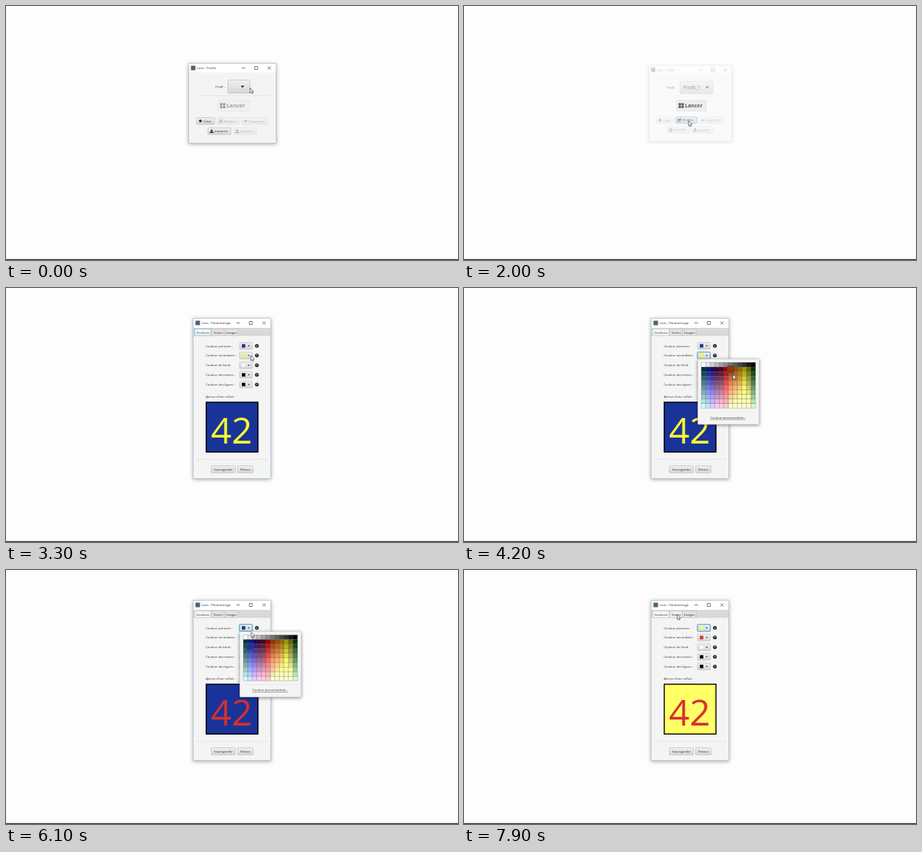
Animation of 600x338 px, one loop 8000 ms. Source, as an HTML page:

```html
<!DOCTYPE html>
<html lang="fr">
<head>
<meta charset="utf-8">
<title>Loto - Paramétrage</title>
<style>
  html, body { margin: 0; width: 100%; height: 100%; overflow: hidden; background: #fdfdfe; }
  svg { display: block; width: 600px; height: 338px; }
  text { font-family: "Open Sans", "Noto Sans", sans-serif; font-size: 4.25px; fill: #333; }
  .window { filter: drop-shadow(0 1px 2.5px rgba(0, 0, 0, .35)); }
  .popup { filter: drop-shadow(0 1px 2px rgba(0, 0, 0, .45)); }
</style>
</head>
<body>
<svg id="stage" viewBox="0 0 600 338">
  <defs>
    <linearGradient id="face" x2="0" y2="1">
      <stop offset="0" stop-color="#f0f0f0"/>
      <stop offset="1" stop-color="#d6d6d6"/>
    </linearGradient>
  </defs>
</svg>
<script>
const LOOP = 8000;
const BLUE = '#1a3399', RED = '#d6302e', YELLOW = '#ffff33', LEMON = '#ffff66';
const FOCUS = '#3fa9d6', EDGE = '#b9b9b9';
const stage = document.getElementById('stage');

function add(parent, tag, attrs = {}, text) {
  const node = document.createElementNS('http://www.w3.org/2000/svg', tag);
  for (const key in attrs) node.setAttribute(key, attrs[key]);
  if (text) node.textContent = text;
  parent.appendChild(node);
  return node;
}
const group = (parent, attrs) => add(parent, 'g', attrs);
const rect = (parent, x, y, width, height, fill, more) =>
  add(parent, 'rect', { x, y, width, height, fill, ...more });
const label = (parent, x, y, text, more) => add(parent, 'text', { x, y, ...more }, text);
const line = (parent, d, stroke = '#333', width = .6) =>
  add(parent, 'path', { d, fill: 'none', stroke, 'stroke-width': width });
const shape = (parent, d, fill = '#333') => add(parent, 'path', { d, fill });
const face = (parent, x, y, w, h) =>
  rect(parent, x, y, w, h, 'url(#face)', { rx: 1, stroke: EDGE, 'stroke-width': .6 });

// Rows are [ms, value, jumps to the next row]; without jumps the value holds.
function track(node, prop, rows) {
  const frames = rows.map(([ms, value, jumps = 1]) => ({
    offset: Math.max(0, ms - 2) / LOOP, [prop]: value, easing: `steps(${jumps}, end)`
  }));
  frames.push({ offset: 1, [prop]: rows[rows.length - 1][1] });
  node.animate(frames, { duration: LOOP, iterations: Infinity });
}
const move = (x, y) => `translate(${x}px, ${y}px)`;

function frame(parent, x, y, w, h, title, bar) {
  rect(parent, x, y, w, h, '#f4f4f4', { stroke: '#a9c3cb', 'stroke-width': .7 });
  rect(parent, x + .4, y + .4, w - .8, bar, '#fff');
  rect(parent, x + 3, y + 3, 6, 6, '#4b6272');
  label(parent, x + 11, y + 7.8, title, { style: 'font-size:4.35px' });
  const r = x + w, m = y + 6;
  line(parent, `M${r - 45.5} ${m}h4.5 M${r - 28.5} ${m - 2}h4v4h-4z M${r - 11} ${m - 2}l4 4m0-4l-4 4`, '#222');
}

const icons = {
  plus: 'M-.7-2h1.4v1.3h1.3v1.4h-1.3v1.3h-1.4v-1.3h-1.3v-1.4h1.3z',
  minus: 'M-2-.7h4v1.4h-4z',
  edit: 'M-2.3-1.6h2.6l-.6.6h-1.4v2.8h2.8v-1.2l.6-.6v2.4h-4z M-.8 .8l.2-1 2.2-2.2 .9.9-2.2 2.2z',
  load: 'M-.7-2.3h1.4v1.8h1.3l-2 1.9-2-1.9h1.3z M-2.5 1h1.2l1.3 1 1.3-1h1.2v1.4h-5z',
  send: 'M0-2.4l2 2h-1.3v1.6h-1.4v-1.6h-1.3z M-2.5 1h1.2v.5h2.6v-.5h1.2v1.4h-5z'
};
function iconButton(parent, x, y, w, icon, text) {
  const g = group(parent);
  face(g, x, y, w, 9);
  add(g, 'path', { d: icons[icon], fill: '#222', transform: `translate(${x + 5} ${y + 4.5})` });
  label(g, x + 9, y + 6.1, text);
  return g;
}
const arrow = (parent, x, y, s) => shape(parent, `M${x - s} ${y - s / 2}h${2 * s}l${-s} ${s * 1.2}z`);

rect(stage, 0, 0, 600, 338, '#fdfdfe');
rect(stage, 0, 336.8, 600, 1.2, '#333');

// Profile window
const profiles = group(stage, { style: 'transform-origin:300.5px 129.5px' });
track(profiles, 'transform', [[0, 'scale(1)'], [2000, 'scale(.95)']]);

const panel = group(profiles, { class: 'window' });
frame(panel, 242.5, 76.5, 116, 106, 'Loto - Profils', 11.5);
line(panel, 'M252 119.5H350', '#d4d4d4', .5);
iconButton(panel, 253, 148.5, 24, 'plus', 'Créer');
const erase = iconButton(panel, 313, 148.5, 34.5, 'minus', 'Supprimer');
iconButton(panel, 268, 162, 30.5, 'load', 'Importer');
const send = iconButton(panel, 302, 162, 30.5, 'send', 'Exporter');
for (const g of [erase, send]) track(g, 'opacity', [[0, .35], [1200, 1]]);
track(panel, 'opacity', [[0, 1], [2000, .3], [2100, 0]]);

const edit = iconButton(profiles, 280, 148.5, 30, 'edit', 'Modifier');
track(edit, 'opacity', [[0, .35], [1200, 1], [2000, .65], [2100, 0]]);
track(edit.firstChild, 'stroke', [[0, EDGE], [1700, FOCUS]]);

const launch = group(profiles);
rect(launch, 281, 125, 42, 15.5, '#ececec', { rx: 1.5, stroke: '#d0d0d0', 'stroke-width': .5 });
for (const x of [284, 288]) for (const y of [129.3, 133]) rect(launch, x, y, 3.3, 3, '#333', { rx: .4 });
label(launch, 293, 135.4, 'Lancer', { style: 'font-size:7.2px;font-weight:700' });
track(launch, 'opacity', [[0, .45], [1200, 1], [2000, .8], [2100, 0]]);

const empty = group(profiles);
label(empty, 278, 109, 'Profil :');
const box = face(empty, 294.5, 98.5, 29.5, 17.5);
arrow(empty, 314, 107.3, 2.4);
track(box, 'stroke', [[0, EDGE], [100, FOCUS]]);
track(empty, 'opacity', [[0, 1], [1200, 0]]);

const chosen = group(profiles);
label(chosen, 267.5, 109, 'Profil :');
face(chosen, 286, 98.5, 46, 17.5);
label(chosen, 290.5, 109.6, 'Profil_1', { style: 'font-size:6.9px' });
arrow(chosen, 324, 107.3, 2.4);
track(chosen, 'opacity', [[0, 0], [1200, 1], [2000, .5], [2100, 0]]);

const list = group(stage, { class: 'popup' });
rect(list, 294.5, 117, 46, 15, '#fff', { stroke: '#c4c4c4', 'stroke-width': .5 });
const item = rect(list, 295, 118.5, 45, 12, '#fff');
label(list, 299, 127, 'Profil_1', { style: 'font-size:6.9px' });
track(item, 'fill', [[0, '#fff'], [900, '#b5dcec']]);
track(list, 'opacity', [[0, 0], [300, .6], [400, 1], [1200, 0]]);

// Settings window
const settings = group(stage, { class: 'window', style: 'transform-origin:300px 147px' });
track(settings, 'opacity', [[0, 0], [2300, .4], [2400, .8], [2500, 1]]);
track(settings, 'transform', [[0, 'scale(.95)'], [2300, 'scale(.96)'], [2400, 'scale(.99)'], [2500, 'scale(1)']]);
frame(settings, 248.5, 40.5, 103, 213, 'Loto - Paramétrage', 12.5);
rect(settings, 249, 53, 102, 10, '#d9d9d9');
line(settings, 'M249 63H351', EDGE, .5);

function tab(x, w, text, fill) {
  const back = rect(settings, x, 54.3, w, 8.9, fill, { stroke: EDGE, 'stroke-width': .5 });
  label(settings, x + 2.2, 60.5, text);
  return back;
}
const colours = tab(250.5, 21.5, 'Couleurs', '#f4f4f4');
const texts = tab(273, 16.2, 'Textes', '#e2e2e2');
tab(290, 18.2, 'Images', '#e2e2e2');
track(colours, 'stroke', [[0, FOCUS], [3900, EDGE]]);
track(texts, 'fill', [[0, '#e2e2e2'], [7800, '#efefef']]);

const rows = [
  ['primaire', BLUE], ['secondaire', YELLOW], ['de fond', '#fff'],
  ['des textes', '#000'], ['des lignes', '#000']
];
const swatches = rows.map(([name, fill], i) => {
  const y = 77 + 12.85 * i;
  label(settings, 265.2, y + 1.6, `Couleur ${name} :`);
  face(settings, 310, y - 4.5, 16.8, 9);
  const swatch = rect(settings, 313, y - 2.4, 4.8, 4.8, fill, { stroke: '#bbb', 'stroke-width': .3 });
  arrow(settings, 322.2, y, 1.4);
  add(settings, 'circle', { cx: 333, cy: y, r: 2.5, fill: '#222' });
  label(settings, 333, y + 1.5, '?', { 'text-anchor': 'middle', style: 'font-size:4px;font-weight:700;fill:#fff' });
  return swatch;
});
const ring = rect(settings, 309.8, 72.3, 17.2, 9.4, 'none', { rx: 1, stroke: FOCUS, 'stroke-width': 1 });
track(ring, 'opacity', [[0, 0], [3900, 1]]);
track(ring, 'transform', [[0, move(0, 12.85)], [6000, move(0, 0)]]);

label(settings, 265.2, 146.3, "Aperçu d'une cellule :", { style: 'font-style:italic' });
const cell = rect(settings, 265.8, 152, 68.7, 66.3, BLUE, { stroke: '#000', 'stroke-width': 1.4 });
const number = label(settings, 299.5, 206.6, '42', { 'text-anchor': 'middle', style: 'font-size:48px' });
line(settings, 'M252 228H348', '#d4d4d4', .5);
for (const [x, w, text] of [[272.5, 32, 'Sauvegarder'], [307.5, 20.5, 'Retour']]) {
  face(settings, x, 236.5, w, 9.5);
  label(settings, x + w / 2, 242.8, text, { 'text-anchor': 'middle' });
}
for (const node of [cell, swatches[0]]) track(node, 'fill', [[0, BLUE], [7100, LEMON]]);
for (const node of [number, swatches[1]]) track(node, 'fill', [[0, YELLOW], [4800, RED]]);

// Colour popup: one grey row, then twelve hues that lighten downwards
const hues = ['033', '01a80', '1a068', '303', '4d01a', '900', '930', '94d0', '960', '990', '660', '030'];
const deep = [
  [0, 51, 51], [0, 26, 128], [26, 0, 104], [51, 0, 51], [77, 0, 26], [153, 0, 0],
  [153, 51, 0], [153, 77, 0], [153, 102, 0], [153, 153, 0], [102, 102, 0], [0, 51, 0]
];
function shade(col, row) {
  const rgb = row ? deep[col].map(v => Math.min(255, Math.round(v + 25.5 * (row - 1))))
                  : Array(3).fill(Math.round(255 * (1 - col / 11)));
  return `rgb(${rgb})`;
}
function picker(y, open, close, hovers) {
  const g = group(stage, { class: 'popup' });
  const left = 315, top = y + 4.5, w = 6, h = 6.1;
  rect(g, 310.3, y, 81.5, 87, '#f4f4f4', { rx: 1.2, stroke: '#c4c4c4', 'stroke-width': .5 });
  for (let row = 0; row < 10; row++) for (let col = 0; col < 12; col++)
    rect(g, left + col * w, top + row * h, w, h, shade(col, row), { stroke: '#555', 'stroke-width': .25 });
  line(g, `M314 ${y + 70.5}H388`, '#dcdcdc', .5);
  label(g, 350.5, y + 79.3, 'Couleur personnalisée..', { 'text-anchor': 'middle', 'text-decoration': 'underline' });
  const hover = rect(g, -1.4, -1.4, w + 2.8, h + 2.8, '#fff', { stroke: '#34506a', 'stroke-width': .8 });
  track(hover, 'transform', hovers.map(([ms, col, row]) => [ms, move(left + col * w, top + row * h)]));
  track(hover, 'fill', hovers.map(([ms, col, row]) => [ms, shade(col, row)]));
  track(g, 'opacity', [[0, 0], [open, 1], [close, 0]]);
}
picker(94.5, 3900, 4800, [[0, 9, 3], [4000, 4, 1], [4100, 6, 1], [4400, 6, 2], [4600, 5, 3]]);
picker(82, 6000, 7100, [[0, 1, 2], [6300, 3, 1], [6500, 5, 3], [6600, 7, 4], [6700, 8, 5], [6900, 9, 6]]);

// Pointer
const pointer = add(stage, 'path', {
  d: 'M0 0V6.6L1.5 5.3L2.5 7.6L3.6 7.1L2.6 4.9L4.7 4.8Z',
  fill: '#fff', stroke: '#222', 'stroke-width': .6
});
track(pointer, 'transform', [
  [0, 324, 109], [100, 316, 107], [600, 316, 107, 4], [1000, 314, 125],
  [1100, 314, 125, 7], [1800, 298, 153], [2300, 298, 153, 8], [3100, 323, 88],
  [3200, 324, 89], [3300, 325, 90], [3800, 325, 90, 4], [4200, 357, 115, 5],
  [4700, 348, 120], [5100, 348, 120, 5], [5600, 319, 77], [6000, 319, 77, 8],
  [6800, 371, 124], [6900, 372, 125], [7100, 372, 125, 8], [7900, 283, 59]
].map(([ms, x, y, jumps]) => [ms, move(x, y), jumps]));
</script>
</body>
</html>
```
